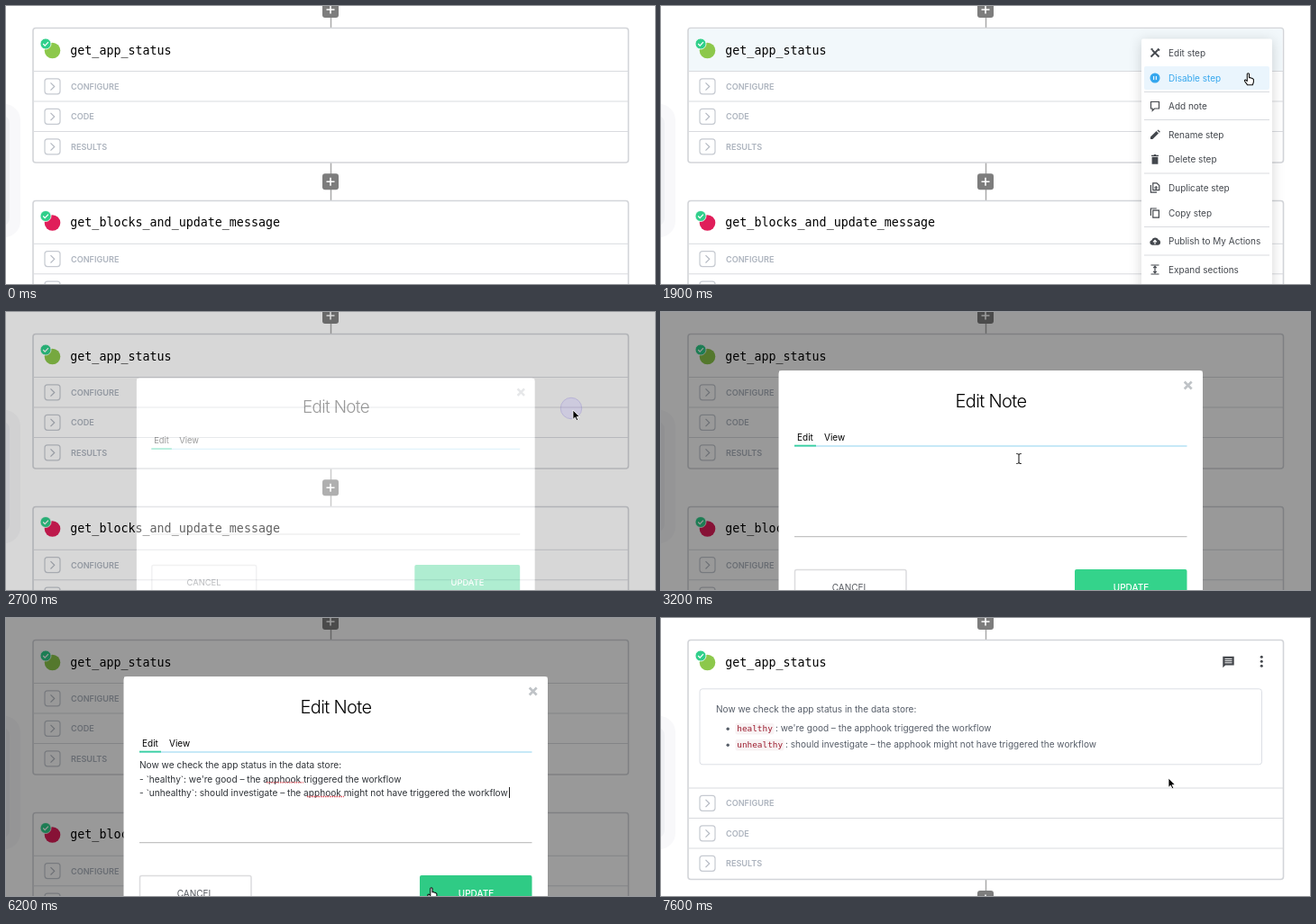
These frames come from a looping animation (720 by 309 pixels, 8 s). An HTML page:

```html
<!DOCTYPE html>
<html lang="en">
<head>
<meta charset="utf-8">
<title>Step note</title>
<style>
html, body { margin: 0; width: 100%; height: 100%; overflow: hidden; background: #fff; }
svg { display: block; width: 720px; height: 309px; font: 10px Inter, sans-serif; }
.mono { font: 13.33px "DejaVu Sans Mono", monospace; }
.code { font: 9.4px "DejaVu Sans Mono", monospace; fill: #9c1c2e; }
.label { font-size: 9.1px; font-weight: 600; fill: #adb4be; }
.note { font-size: 10.04px; fill: #565d68; }
.line { fill: none; stroke: #d9dbdf; }
.icon { fill: none; stroke: currentColor; stroke-width: 1.2; }
.solid { fill: currentColor; stroke: none; }
.item { color: #43474d; fill: currentColor; }
.item rect.back { fill: none; }
.item.on { color: #35a7ee; }
.item.on rect.back { fill: #eaf5fd; }
#menuBox { filter: drop-shadow(0 2px 7px rgba(0, 0, 0, .16)); }
#draft { font-size: 10.12px; fill: #2f3338; }
</style>
</head>
<body>
<svg id="stage" viewBox="0 0 720 309"></svg>
<script>
const LOOP = 8000, SHIFT = 116.5;
const text = (x, mid, s, cls = '', extra = '') =>
  `<text x="${x}" y="${mid + 3.6}" class="${cls}" ${extra}>${s}</text>`;
const path = (d, cls = '', extra = '') => `<path d="${d}" class="${cls}" ${extra}/>`;

const plus = (y) => `<rect x="351" y="${y - 9}" width="18" height="18" rx="3" fill="#7d7d7d"/>` +
  path(`M355.5 ${y}h9M360 ${y - 4.5}v9`, '', 'stroke="#fff" stroke-width="1.6"');
const wire = (a, b) => path(`M360.5 ${a}V${b}`, '', 'stroke="#a9a9a9" stroke-width="1.5"');
const row = (y, s) => path(`M31 ${y - 17}H690`, 'line') +
  `<rect x="43" y="${y - 8.7}" width="17" height="17" rx="3" fill="#fff" stroke="#c6cad1" stroke-width="1.2"/>` +
  path(`M49.5 ${y - 4.2}l4.2 4.2l-4.2 4.2`, '', 'fill="none" stroke="#b4b9c2" stroke-width="1.2"') +
  text(72, y - .3, s, 'label');
const rows = y => ['CONFIGURE', 'CODE', 'RESULTS'].map((s, i) => row(y + i * 33.5, s)).join('');
const frame = (y, h) =>
  `<rect x="30" y="${y}" width="660.5" height="${h}" rx="3" fill="#fff" stroke="#d3d5d9" stroke-width="1.6"/>`;
const title = (y, name, colour) =>
  `<circle cx="51.5" cy="${y + .5}" r="8.8" fill="${colour}"/>
   <circle cx="44" cy="${y - 7}" r="6" fill="#30cf8b" stroke="#fff" stroke-width=".8"/>` +
  path(`M41.2 ${y - 7}l2 2.1l3.7-4`, '', 'fill="none" stroke="#fff" stroke-width="1.3"') +
  `<text x="71.3" y="${y + 4.5}" class="mono">${name}</text>`;

const GLYPHS = [
  path('M-4.5 4.5L3 -3M-3 -3L4.5 4.5M-4.5 -3.5l2-1M3 -4.5l2 2', 'icon', 'style="stroke-width:1.8"'),
  '<circle r="5.5" class="solid"/>' + path('M-1.4 -2v4M1.4 -2v4', '', 'stroke="#eaf5fd" stroke-width="1.2"'),
  path('M-4.5 -4.5h9v7.5h-5l-2.3 2.3v-2.3h-1.7z', 'icon'),
  path('M-5 5v-2.4L1.6 -4l2.4 2.4L-2.6 5zM2.4 -4.7l1.2-.9l2.3 2.3l-1 1.1z', 'solid'),
  path('M-4 -4.8h2.5l.6-.7h1.8l.6.7H4v1.3h-8zM-3.4 -2.8h6.8V5.2h-6.8z', 'solid'),
  path('M-2.2 -5.2h4.2l2.8 2.8v5h-7zM-4.6 -3v8.2h6.6M1.2 -2v4M-.8 0h4', 'icon'),
  path('M-2.2 -2.8h6.6v8h-6.6zM-4.6 3v-8h6.4', 'icon'),
  path('M-3.2 4.2a2.8 2.8 0 0 1-.4-5.5a4 4 0 0 1 7.4-.4a3 3 0 0 1 -.3 5.9z', 'solid') +
    path('M0 3.2v-4M-2 .8l2-2l2 2', '', 'fill="none" stroke="#fff" stroke-width="1.2"'),
  path('M-4.5 -5h9M-4.5 5h9M0 -3.5v7M-1.8 -1.8l1.8-1.8l1.8 1.8M-1.8 1.8l1.8 1.8l1.8-1.8', 'icon'),
];
const ITEMS = [[52, 'Edit step'], [80, 'Disable step'], [111, 'Add note'], [143, 'Rename step'],
  [170.5, 'Delete step'], [202, 'Duplicate step'], [230, 'Copy step'],
  [261.5, 'Publish to My Actions'], [293, 'Expand sections']];
const item = ([y, s], i) => `<g class="item"><rect class="back" x="536" y="${y - 13}" width="139" height="26" rx="2"/>
  <g transform="translate(548 ${y})">${GLYPHS[i]}</g>${text(563, y, s)}</g>`;

const APPHOOK = ' – the apphook might not have triggered the workflow';
const GOOD = "we're good – the apphook triggered the workflow";
const squiggle = (id, x, y) =>
  path(`M${x} ${y}h41`, '', `id="${id}" stroke="#e2505a" stroke-width="1.3" stroke-dasharray="1.5 1"`);

stage.innerHTML = `
<rect x="-40" y="109" width="56" height="148" rx="18" fill="#f8f8fa"/>
<rect x="-40" y="122" width="44" height="122" rx="8" fill="#eff0f3"/>
${wire(0, 24)}${plus(4)}
<g id="closed">
  ${wire(174, 216)}${plus(195.3)}${frame(24.5, 149.5)}
  <rect id="tint" x="31" y="25.5" width="658.5" height="47" fill="#f2f8fb"/>
  ${rows(89.5)}
  ${frame(216.5, 149.5)}${title(240.5, 'get_blocks_and_update_message', '#e01e5a')}${rows(281.3)}
</g>
<g id="opened">
  ${wire(290, 309)}${plus(312)}${frame(24.5, 149.5 + SHIFT)}
  <rect id="noteBox" x="43" y="78.8" width="623.5" height="84" rx="3" stroke="#dcdfe5"/>
  ${rows(89.5 + SHIFT)}
  ${text(61, 101.5, 'Now we check the app status in the data store:', 'note')}
  <g class="note"><circle cx="74.2" cy="123.3" r="1.7"/><circle cx="74.2" cy="141.3" r="1.7"/></g>
  <g fill="#f8f3f4"><rect x="82.5" y="117" width="43" height="12.5" rx="2"/><rect x="82.5" y="135" width="54" height="12.5" rx="2"/></g>
  ${text(84.3, 122.6, 'healthy', 'code')}${text(127, 122.8, ': ' + GOOD, 'note')}
  ${text(84.3, 140.6, 'unhealthy', 'code')}${text(138, 140.8, ': should investigate' + APPHOOK, 'note')}
  ${path('M623.3 42.8h12.4v9.6h-9.6l-2.8 2.8z', '', 'fill="#43464b"')}
  ${path('M625.5 45.4h8M625.5 47.6h8M625.5 49.8h8', '', 'stroke="#fff"')}
</g>
${title(49, 'get_app_status', '#8cc84b')}
<g id="kebab" fill="#43464b"><circle cx="666.3" cy="43.3" r="1.5"/><circle cx="666.3" cy="48.3" r="1.5"/><circle cx="666.3" cy="53.3" r="1.5"/></g>
<g id="menu">
  <rect id="menuBox" x="533" y="36.5" width="145" height="300" rx="2" fill="#fff"/>
  ${path('M536 95.5h139M536 126.5h139M536 186h139M536 245.5h139M536 277h139', 'line')}
  ${ITEMS.map(item).join('')}
</g>
<g id="modal">
  <!-- the shade leaves a hole for the dialog, so the page behind it stays bright -->
  ${path('M-99 -99H819V409H-99zM131 65.5H600.5V346H131z', '', 'fill-rule="evenodd" fill-opacity=".4"')}
  <rect x="130.5" y="65" width="470.5" height="281" rx="4" fill="#fff"/>
  <text x="366" y="105.5" text-anchor="middle" style="font-size:20px;font-weight:300;letter-spacing:-.65px">Edit Note</text>
  ${path('M580.7 77.5l8 8M588.7 77.5l-8 8', '', 'stroke="#bfc3c7" stroke-width="2.6"')}
  ${text(151, 139, 'Edit')}${text(181, 139, 'View')}
  ${path('M148 149H583.5', '', 'stroke="#b4e2f5" stroke-width="1.4"')}
  ${path('M148 148.6h24', '', 'stroke="#3ad0a0" stroke-width="1.8"')}
  ${path('M148 249.7H583.5', '', 'stroke="#c3c3c3" stroke-width="1.2"')}
  <g id="draft">
    ${text(148, 163.5, 'Now we check the app status in the data store:')}
    ${text(148, 179, '- `healthy`: ' + GOOD)}
    ${text(148, 194.5, '- `unhealthy`: should investigate' + APPHOOK)}
    ${squiggle('wave2', 289, 182.8)}${squiggle('wave3', 334, 198.5)}
    ${path('M558.5 188v12', '', 'id="caret" stroke="#222"')}
  </g>
  <rect x="148.5" y="286.5" width="123.5" height="40" rx="2" fill="#fff" stroke="#dcdcde" stroke-width="1.5"/>
  <rect id="update" x="459" y="286" width="124.5" height="41" rx="2"/>
  ${text(210, 306.5, 'CANCEL', '', 'text-anchor="middle" fill="#55595f"')}
  ${text(521.5, 306.5, 'UPDATE', '', 'text-anchor="middle" fill="#fff" font-weight="500"')}
</g>
<circle id="ring" fill="#9d8cff" stroke="#8a80c8" stroke-opacity=".4"/>
<g id="cursor" stroke-linejoin="round">
  ${path('M0 0v10.3l2.4-2.2l1.6 3.6l1.7-.8l-1.6-3.4h3.3z', '', 'id="arrow" stroke="#fff" stroke-width=".8"')}
  ${path('M-1.2 .8a1.1 1.1 0 0 1 2.2 0v4l1-.2l1.1.5l1 .1l1 .6l.8 .8v3l-1.1 3.2h-5.6l-3.2-4.3q-.4-1.6 1.1-1.4l1.7 1.4z', '', 'id="hand" fill="#fff" stroke="#111" stroke-width="1.1"')}
  ${path('M-2.8 -5.5q2.8 0 2.8 1.5q0-1.5 2.8-1.5M0 -4.5v9M-2.8 5.5q2.8 0 2.8-1.5q0 1.5 2.8 1.5', '', 'id="beam" fill="none" stroke="#222" stroke-width="1.1"')}
</g>`;

const $ = id => document.getElementById(id);
const show = (id, on) => $(id).style.display = on ? '' : 'none';
const ramp = (t, from, to) => Math.min(1, Math.max(0, (t - from) / (to - from)));
const between = (t, a, b) => t >= a && t < b;

const MOVES = [[100, 724, 68], [900, 666, 50], [1700, 666, 50], [1900, 651.5, 75], [2300, 627, 107],
  [2500, 629, 109], [2700, 629, 109], [3150, 397, 163], [3400, 397, 163], [4200, 349, 190],
  [5000, 349, 190], [5800, 472, 300], [7150, 472, 300], [7600, 563, 178]];
const CLICKS = [[1000, 666, 50], [2550, 627, 107], [6400, 471, 299]];
const lines = [...document.querySelectorAll('.item')];

function pointer(t) {
  const i = MOVES.findIndex(m => m[0] > t);
  if (i < 1) return i ? MOVES.at(-1).slice(1) : MOVES[0].slice(1);
  const [a, x, y] = MOVES[i - 1], [b, u, v] = MOVES[i];
  const p = ramp(t, a, b), e = p * p * (3 - 2 * p);
  return [x + (u - x) * e, y + (v - y) * e];
}

function draw(t) {
  const [x, y] = pointer(t);
  const saved = t >= 6400;
  const modalOn = ramp(t, 2600, 2860) * (1 - ramp(t, 6490, 6690));
  const menuOn = ramp(t, 1050, 1300) * (1 - ramp(t, 2550, 2650));

  show('closed', !saved);
  show('opened', saved);
  show('kebab', t < 2550 ? x < 690 && t > 100 : y < 290 && saved);
  $('tint').setAttribute('opacity', ramp(t, 950, 1100) * (1 - ramp(t, 2500, 2650)));
  const white = ramp(t, 6700, 7000);
  $('noteBox').setAttribute('fill', `rgb(${245 + 10 * white},${247 + 8 * white},${251 + 4 * white})`);

  $('menu').setAttribute('opacity', menuOn);
  $('menu').setAttribute('transform', `translate(0 36) scale(1 ${.8 + .2 * ramp(t, 1050, 1300)}) translate(0 -36)`);
  const hovered = y < 66 ? 0 : y < 95 ? 1 : 2;
  lines.forEach((el, i) => el.classList.toggle('on', i === hovered));

  $('modal').setAttribute('opacity', modalOn);
  $('modal').setAttribute('transform',
    `translate(366 205.6) scale(${.9 + .1 * modalOn}) translate(-366 -205.6)`);
  show('draft', t >= 4600);
  show('wave2', t >= 5100);
  show('caret', t < 6400);
  const onButton = y > 286 && between(t, 5000, 6400);
  $('update').setAttribute('fill', onButton ? '#2fcb85' : '#34d38b');

  const click = CLICKS.find(c => between(t, c[0], c[0] + 400));
  show('ring', click);
  if (click) {
    const age = t - click[0];
    $('ring').setAttribute('cx', click[1]);
    $('ring').setAttribute('cy', click[2]);
    $('ring').setAttribute('r', 4.5 + age * .048);
    $('ring').setAttribute('fill-opacity', .6 * (1 - ramp(age, 0, 230)));
    $('ring').setAttribute('opacity', 1 - (age / 400) ** 2);
  }

  const beam = between(t, 2800, 6000) && x < 583 && y > 149 && y < 249;
  const hand = between(t, 850, 2600) || (y > 286 && between(t, 5000, 7200));
  show('beam', beam);
  show('hand', hand);
  show('arrow', !beam && !hand);
  show('cursor', t >= 100);
  $('cursor').setAttribute('transform', `translate(${x} ${y})`);
}

function tick() {
  draw(performance.now() % LOOP);
  requestAnimationFrame(tick);
}
tick();
</script>
</body>
</html>
```
